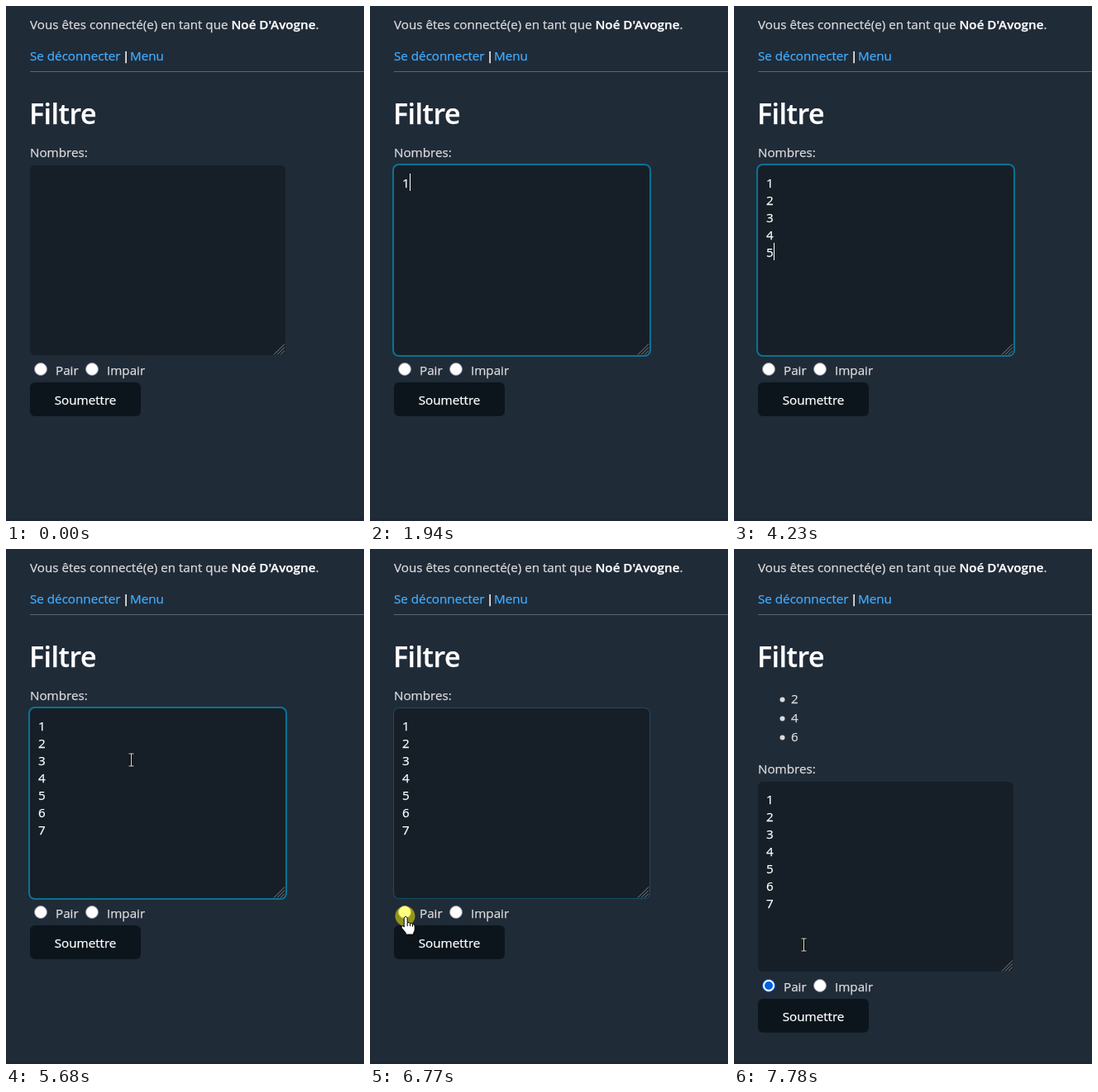
These frames come from a looping animation (433x624 px, 8 s). An HTML page:

```html
<!DOCTYPE html>
<html lang="fr">
<head>
<meta charset="utf-8">
<title>Filtre</title>
<style>
  html, body { margin: 0; width: 100%; height: 100%; overflow: hidden; background: #202b38; }
  svg { display: block; width: 433px; height: 624px; }
  text {
    font: 15.2px "Open Sans", "Noto Sans", sans-serif; white-space: pre;
    color: #dbdbdb; fill: currentColor; stroke: currentColor; stroke-width: .25;
  }
  .link { color: #41adff; }
  .bright { color: #fff; }
  .strong { color: #fff; fill: currentColor; stroke: currentColor; font-weight: 600; }
  .title { color: #fff; font-size: 34px; font-weight: 600; letter-spacing: -.5px; }
  .ring { fill: #0096bf; }
  .radio { fill: #fff; stroke: #8f8f9d; }
  .mark { fill: #0060df; }
  .cursor { fill: #fff; stroke: #000; stroke-linejoin: round; }
  .beam { fill: none; stroke: #e6e6e6; }
  .beam.edge { stroke: #000; stroke-width: 2.6; }
</style>
</head>
<body>
<svg viewBox="0 0 433 624">
  <rect width="433" height="624" fill="#202b38"/>
  <rect y="621" width="433" height="3" fill="#1d2733"/>
  <text x="29" y="28">Vous êtes connecté(e) en tant que <tspan class="strong">Noé D'Avogne</tspan>.</text>
  <text class="link" x="29" y="66">Se déconnecter</text>
  <text class="strong" x="141" y="66">|</text>
  <text class="link" x="150" y="66">Menu</text>
  <rect x="29" y="79" width="404" height="1" fill="#5d6770"/>
  <text class="title" x="28" y="143">Filtre</text>

  <g id="results"></g>

  <g id="form">
    <text x="29" y="183">Nombres:</text>
    <rect id="areaRing" class="ring"/>
    <rect x="29" y="193" width="309" height="230" rx="6" fill="#161f27"/>
    <path d="M324 422.500L337 409.500M328 422.500L337 413.500M332 422.500L337 417.500" stroke="#8b9195" stroke-width=".9"/>
    <g id="lines"></g>
    <rect id="caret" width="1" height="21" fill="#fff"/>
    <circle class="radio" id="even" cx="42" cy="440" r="7.500"/>
    <circle class="mark" id="mark" cx="42" cy="440" r="5"/>
    <circle class="radio" cx="104" cy="440" r="7.500"/>
    <text x="60" y="447">Pair</text>
    <text x="122" y="447">Impair</text>
    <g id="button">
      <rect id="buttonRing" class="ring"/>
      <rect id="face" x="29" y="456" width="134" height="41" rx="6"/>
      <text class="bright" x="96" y="483" text-anchor="middle">Soumettre</text>
    </g>
  </g>

  <g id="pointer">
    <circle id="press" r="12" fill="#ff0" fill-opacity=".5"/>
    <g id="beam">
      <path class="beam edge" d="M-3-7.500H3M-3 7.500H3M0-7.500V7.500"/>
      <path class="beam" d="M-3-7.500H3M-3 7.500H3M0-7.500V7.500"/>
    </g>
    <path id="arrow" class="cursor" d="M0 0V16L3.700 12.600L6.200 18.400L8.600 17.400L6.200 11.700H11.400Z"/>
    <path id="hand" class="cursor" transform="translate(.7 .3)" d="M-2 1.500Q0-1 2 1.500V8Q4 6.500 5.300 8.500Q7.500 7.500 8.300 9.500Q11 9 11 12V16Q11 18 9.500 20V22H0V20L-5 14Q-6 11-3.500 11.500L-2 13ZM2 8V12M5.300 8.500V12M8.300 9.500V12.500"/>
  </g>
</svg>
<script>
const LOOP = 8000, SHIFT = 89;
const ARRIVE = 260, FOCUS = 1160, TYPE = 1940, RETURN = 5410;
const PICK = 6710, SUBMIT = 7640, CLICK = 140, LOADED = SUBMIT + CLICK;
const DIGITS = 7, ROW = 21;

const $ = id => document.getElementById(id);
const clamp = v => Math.min(1, Math.max(0, v));
const smooth = p => p * p * (3 - 2 * p);
const show = (id, on) => $(id).setAttribute('visibility', on ? 'visible' : 'hidden');
const set = (id, attrs) => {
  for (const name in attrs) $(id).setAttribute(name, attrs[name]);
};

for (let n = 1; n <= DIGITS; n++) {
  $('lines').innerHTML += `<text class="bright" x="39" y="${199 + ROW * n}">${n}</text>`;
  if (n % 2) continue;
  const y = 164 + 11.5 * n;
  $('results').innerHTML += `<circle cx="58.500" cy="${y - 4.5}" r="3" fill="#dbdbdb"/><text x="69" y="${y}">${n}</text>`;
}

// Digit and Enter alternate: three slow gaps, then a quick steady pace.
const keyTime = k => TYPE + 468 * Math.min(k, 3) + 176 * Math.max(k - 3, 0);

function typingAt(t) {
  let keys = 0;
  while (keys < 2 * DIGITS - 1 && keyTime(keys) <= t) keys++;
  const digits = Math.ceil(keys / 2), row = Math.floor(keys / 2) - (keys === 2 * DIGITS ? 1 : 0);
  // A key turns the caret on; a free-running timer toggles it.
  const tick = time => Math.floor((time - 1720) / 527);
  const since = keys ? keyTime(keys - 1) : FOCUS + 70;
  const caret = t >= since && t < PICK && (tick(t) - tick(since)) % 2 === 0;
  return { digits, row, caret };
}

function pointerAt(t) {
  let x = 358, y = 606;
  const glide = (start, time, toX, toY) => {
    const e = smooth(clamp((t - start) / time));
    x += (toX - x) * e;
    y += (toY - y) * e;
  };
  glide(ARRIVE, 750, 124.5, 255.5);
  glide(RETURN - 40, 110, 151.5, 255.5);
  glide(5680, 770, 42.5, 444.8);
  glide(6900, 280, 84.5, 479.5);
  return [x, y];
}

function ring(id, x, y, w, h, p) {
  const s = 2 * p;
  set(id, { x: x - s, y: y - s, width: w + 2 * s, height: h + 2 * s, rx: 6 + s, opacity: .67 * p });
}

function render(t) {
  const loaded = t >= LOADED;
  const shift = loaded ? SHIFT : 0;
  const fade = start => clamp((t - start) / 100);
  set('form', { transform: `translate(0 ${shift})` });
  show('results', loaded);

  const { digits, row, caret } = typingAt(t);
  [...$('lines').children].forEach((line, i) => line.setAttribute('visibility', i < digits ? 'visible' : 'hidden'));
  show('caret', caret);
  set('caret', { x: digits > row ? 48 : 39, y: 203 + ROW * row });

  ring('areaRing', 29, 193, 309, 230, fade(FOCUS - 20) - fade(PICK + 10));
  ring('buttonRing', 29, 456, 134, 41, loaded ? 0 : fade(SUBMIT + 20));

  const checked = t >= PICK + CLICK;
  show('mark', checked);
  $('even').style.stroke = checked ? '#0060df' : '';

  const visible = (t >= ARRIVE && t < TYPE) || t >= RETURN;
  const [x, top] = pointerAt(t);
  const y = top - shift;
  const within = (x0, y0, x1, y1) => x >= x0 && x <= x1 && y >= y0 && y <= y1;
  const onButton = within(29, 456, 163, 497);
  const kind = within(29, 193, 338, 423) ? 'beam'
    : onButton || within(32, 430, 168, 453) ? 'hand' : 'arrow';
  for (const id of ['beam', 'hand', 'arrow']) show(id, visible && id === kind);
  show('press', [FOCUS, PICK, SUBMIT].some(start => t >= start && t < start + CLICK));
  set('pointer', { transform: `translate(${x} ${top})` });

  set('face', { fill: visible && onButton ? '#040a0f' : '#0c151c' });
  set('button', { transform: `translate(0 ${t >= SUBMIT && !loaded ? 2 : 0})` });
}

function tick() {
  render(performance.now() % LOOP);
  requestAnimationFrame(tick);
}
tick();
</script>
</body>
</html>
```
